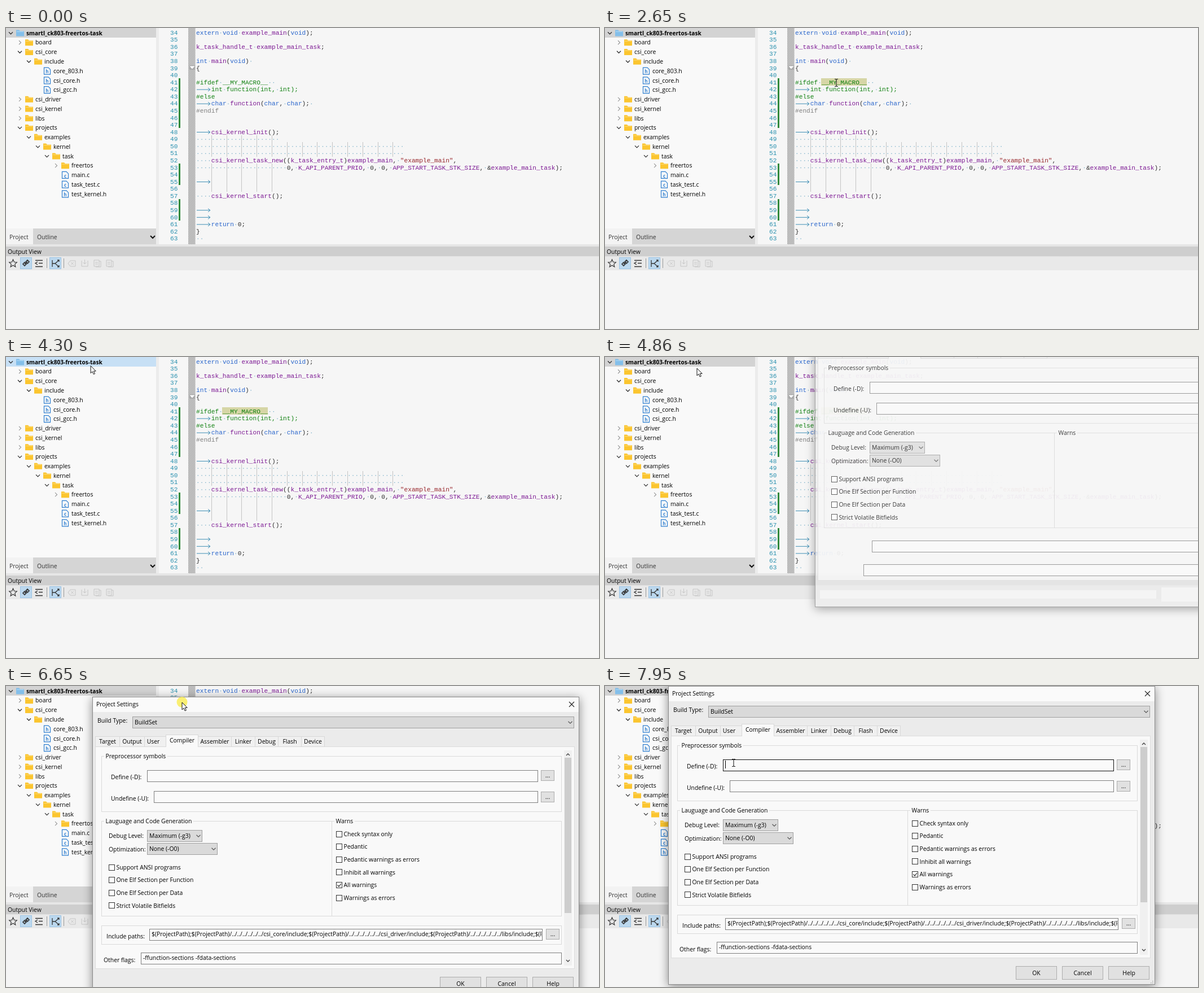
An HTML page with a canvas that plays this animation: 1051 by 533 pixels, repeating every 8000 ms.

```html
<!DOCTYPE html>
<html lang="en">
<head>
<meta charset="utf-8">
<title>Project settings</title>
<style>
html, body { margin: 0; width: 100%; height: 100%; overflow: hidden; background: #f5f5f5; }
canvas { display: block; }
</style>
</head>
<body>
<canvas id="stage" width="1051" height="533"></canvas>
<script>
const g = document.getElementById('stage').getContext('2d');
const UI = '10.4px "Open Sans", "Noto Sans", sans-serif';
const BOLD = 'bold 10.1px "Open Sans", "Noto Sans", sans-serif';
const MONO = '11.17px "Liberation Mono", monospace';
const LOOP = 8000, COL = 6.7, ROW = 12.57, LEFT = 337;

function box(x, y, w, h, fill, border) {
  if (fill) { g.fillStyle = fill; g.fillRect(x, y, w, h); }
  if (border) { g.strokeStyle = border; g.lineWidth = 1; g.strokeRect(x + .5, y + .5, w - 1, h - 1); }
}
function text(s, x, y, color = '#000', font = UI, align = 'left') {
  g.font = font; g.fillStyle = color; g.textAlign = align;
  g.fillText(s, x, y + 3.7);
}
function line(d, color, width = 1) {
  g.strokeStyle = color; g.lineWidth = width;
  g.stroke(new Path2D(d));
}
function shape(d, fill) { g.fillStyle = fill; g.fill(new Path2D(d)); }
function disc(x, y, r, fill) {
  g.fillStyle = fill; g.beginPath(); g.arc(x, y, r, 0, 7); g.fill();
}
function down(x, y, color = '#555', r = 3.5, width = 1.1) {
  line(`M${x - r} ${y - r / 2}l${r} ${r} ${r} ${-r}`, color, width);
}

// [depth, kind, label]; kinds: o open folder, c closed folder, h / C file
const tree = [
  [0, 'o', 'smartl_ck803-freertos-task'], [1, 'c', 'board'], [1, 'o', 'csi_core'],
  [2, 'o', 'include'], [3, 'h', 'core_803.h'], [3, 'h', 'csi_core.h'], [3, 'h', 'csi_gcc.h'],
  [1, 'c', 'csi_driver'], [1, 'c', 'csi_kernel'], [1, 'c', 'libs'], [1, 'o', 'projects'],
  [2, 'o', 'examples'], [3, 'o', 'kernel'], [4, 'o', 'task'], [5, 'c', 'freertos'],
  [5, 'C', 'main.c'], [5, 'C', 'task_test.c'], [5, 'h', 'test_kernel.h']
];

const code = {
  34: 'extern void example_main(void);', 36: 'k_task_handle_t example_main_task;',
  38: 'int main(void) ', 39: '{', 41: '#ifdef __MY_MACRO__  ',
  42: '\tint function(int, int);', 43: '#else', 44: '\tchar function(char, char); ', 45: '#endif',
  48: '\tcsi_kernel_init();', 49: ' '.repeat(22), 50: ' '.repeat(55), 51: ' '.repeat(55),
  52: '    csi_kernel_task_new((k_task_entry_t)example_main, "example_main",',
  53: ' '.repeat(24) + '0, K_API_PARENT_PRIO, 0, 0, APP_START_TASK_STK_SIZE, &example_main_task);',
  55: '\t', 57: '    csi_kernel_start();', 59: '\t', 60: '\t', 61: '\treturn 0;', 62: '}', 63: '  '
};
const fixed = { 41: '#108010', 42: '#108010', 43: '#108010', 45: '#808080' };
const TOKEN = /\t| |"[^"]*"|#?[A-Za-z_]\w*|\d+|[^\w\s"#]+/g;

function tokenColor(s) {
  if (/^(extern|void|int|char|return)$/.test(s)) return '#2a66cc';
  if (s[0] === '"') return '#98262c';
  return /^[A-Za-z_]/.test(s) ? '#7d1a94' : '#303030';
}

function sidebar(t) {
  box(0, 0, 266, 355, '#f9f9f9');
  box(0, 0, 266, 17, t >= 3540 && t < 4620 ? '#c7e0f5' : '#d3d3d3');
  tree.forEach(([d, kind, label], i) => {
    const x = 8.5 + 16 * d, y = 9 + 16.76 * i, ix = x + 16.5;
    if (kind === 'o') down(x, y, '#333', 3.5, 1.3);
    if (kind === 'c') line(`M${x - 1.5} ${y - 3.5}l3.5 3.5-3.5 3.5`, '#999', 1.2);
    if (/[oc]/.test(kind)) {
      shape(`M${ix - 7} ${y - 5.5}h5l2 2h7v9h-14z`, i ? '#fbc52f' : '#83bfea');
      line(`M${ix - 6} ${y - 2.5}h12`, i ? '#fddd83' : '#b4dbf5');
    } else {
      line(`M${ix - 5.5} ${y - 6}h7.5l3.5 3.5v8.5h-11z`, '#2f7fd0', 1.2);
      text(kind.toLowerCase(), ix, y + .5, '#2f7fd0', 'bold 8px "Open Sans", sans-serif', 'center');
    }
    text(label, 36 + 16 * d, y, '#000', i ? UI : BOLD);
  });
  box(0, 355, 266, 28, '#d5d5d5');
  box(0, 355, 48, 28, '#f3f3f3');
  text('Project', 6, 370, '#333');
  text('Outline', 55, 370, '#333');
  down(260, 370, '#111', 4, 2);
  box(266, 0, 5, 383, '#ececec');
}

function editor(t) {
  box(271, 0, 780, 383, '#f6f6f6');
  box(323, 0, 12.5, 383, '#c6c6c6');
  g.save();
  g.beginPath(); g.rect(323, 0, 12.5, 383); g.clip();
  for (let y = -12; y < 383; y += 3) line(`M323 ${y + 13}l13-13`, '#a9a9a9');
  g.restore();
  box(325, 66, 10, 8, '#aaa');
  shape('M325.5 67.5h9l-4.5 5z', '#fff');
  for (const [y, h] of [[89, 88], [240, 38], [303, 38]]) box(306, y, 3, h, '#328a3c');

  for (let k = 1; k <= 13; k++) {
    const x = Math.round(LEFT + k * 4 * COL) + .5;
    line(k < 6 ? `M${x} 190V228M${x} 240V290` : `M${x} 202V228`, '#c4c4c4');
  }
  if (t >= 1900) box(383, 89, 81, 13, '#d6d6a6');
  for (let n = 34; n <= 63; n++) {
    const y = 8 + ROW * (n - 34);
    text(n, 304.5, y, '#2b91af', MONO, 'right');
    let col = 0;
    for (const s of (code[n] || '').match(TOKEN) || []) {
      const x = LEFT + col * COL;
      if (s === '\t') {
        line(`M${x + 1} ${y + .5}h24m-4-3l4 3-4 3`, '#3f8fb5');
        col += 4;
        continue;
      }
      if (s === ' ') box(x + 2.7, y, 1.3, 1.3, '#6fa9c4');
      else text(s, x, y, fixed[n] || tokenColor(s), MONO);
      col += s.length;
    }
  }
  if (t >= 1530 && t < 1900) box(476.5, 90, 1, 12, '#000');
}

function output() {
  box(0, 383, 1051, 4, '#e6e6e6');
  box(0, 387, 1051, 17.5, '#cecece');
  text('Output View', 3, 396.5);
  box(0, 404.5, 1051, 25, '#e9e9e9');
  box(0, 429, 1051, 104, '#f5f5f5');
  for (const x of [25, 77]) box(x, 406, 21, 21, '#bcd8ee', '#9dc4e4');
  for (const x of [72, 102]) box(x, 408, 1, 17, '#999');
  line('M12.5 410l2 4.5 4.8.4-3.6 3.2 1.1 4.8-4.3-2.6-4.3 2.6 1.1-4.8-3.6-3.2 4.8-.4z', '#333', 1.2);
  line('M30 418l3-3 3 3-3 3zM35 414l3-3 3 3-3 3zM33 418l5-4', '#333', 1.6);
  line('M52 411.5h13M58 416.5h7M52 422.5h13M56 414l-4 2.5 4 2.5', '#333', 1.4);
  line('M82 411v12M82 417h5l6-5M87 417l6 5M91 411h3v3M91 423h3v-3', '#333', 1.3);
  const pale = '#c6c6c6';
  line('M110 417l4-5h9v10h-9zM115 414.5l5 5M120 414.5l-5 5', pale);
  line('M134 412v10h11v-10M139.5 410v8m-3-3l3 3 3-3', pale);
  for (const x of [162, 184]) line(`M${x - 6} 411h9v11h-9zM${x + 3} 413h3v10h-9M${x - 4} 415h5m-5 3h5`, pale);
}

function combo(x, y, w, s, fill = '#dadada') {
  box(x, y, w, 21, fill, '#a0a0a0');
  text(s, x + 4, y + 10);
  down(x + w - 7, y + 10.5);
}
function button(x, y, w, h, s) {
  box(x, y, w, h, '#e1e1e1', '#adadad');
  text(s, x + w / 2, y + h / 2, '#000', UI, 'center');
}
function field(x, y, w, s = '', border = '#7f7f7f') {
  box(x, y, w, 21, '#fafafa', border);
  g.save();
  g.beginPath(); g.rect(x + 1, y, w - 3, 20); g.clip();
  text(s, x + 4, y + 9.5);
  g.restore();
}
function group(x, y, w, h, s) {
  box(x, y, w, h, null, '#dadada');
  if (!s) return;
  g.font = UI;
  box(x + 5, y - 2, g.measureText(s).width + 5, 5, '#f9f9f9');
  text(s, x + 7.5, y);
}
function check(x, y, s, on) {
  const top = Math.round(y - 5.5);
  box(x, top, 11, 11, '#fff', '#333');
  if (on) line(`M${x + 2.5} ${top + 5.5}l2.5 2.5 4-5`, '#222', 1.2);
  text(s, x + 13.5, y);
}

const UP = '/..'.repeat(6) + '/', ROOT = '$(ProjectPath)';
const includes = [ROOT, ...['csi_core', 'csi_driver', 'libs'].map(d => ROOT + UP + d + '/include'), ROOT].join(';');
const tabs = [['Target', 5, 48], ['Output', 48, 92], ['User', 92, 130], ['Compiler', 130, 187], ['Assembler', 187, 246],
  ['Linker', 246, 288], ['Debug', 288, 329], ['Flash', 329, 370], ['Device', 370, 411]];

// Shadow only outside the window, so it cannot darken a fading dialog.
function shadow(w, h) {
  g.save();
  const outside = new Path2D();
  outside.rect(-40, -40, w + 80, h + 80);
  outside.rect(0, 0, w, h);
  g.clip(outside, 'evenodd');
  g.shadowColor = 'rgba(0,0,0,.45)'; g.shadowBlur = 16; g.shadowOffsetY = 3;
  box(0, 0, w, h, '#000');
  g.restore();
}

function dialog(t) {
  const [x, y] = place(windowPath, t).map(Math.round);
  const ready = t >= 4950, focus = t >= 7800;
  g.save();
  g.globalAlpha = Math.min(1, (t - 4780) / 105);
  g.translate(x, y);
  shadow(863, 529);
  box(0, 0, 863, 529, '#ebebeb');
  box(0, 0, 863, 529, null, '#8a8a8a');
  box(1, 1, 861, 26, '#fafafa');
  text('Project Settings', 7, 13.5);
  line('M845 9l9 9m0-9l-9 9', '#222', 1.1);
  text('Build Type:', 9, 42);
  combo(71, 35, 783, 'BuildSet', t < 6500 ? '#d3dee6' : '#d9d9d9');

  box(5, 88, 850, 394, '#f9f9f9', '#dcdcdc');
  for (const [s, a, b] of tabs) {
    const active = s === 'Compiler';
    box(a, active ? 67 : 70, b - a + 1, active ? 22 : 19, active ? '#f9f9f9' : '#f0f0f0', '#d8d8d8');
    if (active) box(a + 1, 86, b - a - 1, 4, '#f9f9f9');
    text(s, s === 'User' ? 108 : (a + b) / 2 + .5, active ? 77.5 : 79.5, '#000', UI, 'center');
  }

  group(16, 105, 816, 99, 'Preprocessor symbols');
  text('Define (-D):', 33, 142);
  field(97, 130, 693, '', focus ? '#111' : '#7f7f7f');
  if (focus) box(101, 132, 1, 14, '#000');
  text('Undefine (-U):', 33, 180);
  field(109, 167, 681);
  for (const by of [130, 168]) button(795, by, 24, 19, '...');

  group(16, 220, 409, 169, 'Lauguage and Code Generation');
  group(424, 220, 408, 169, 'Warns');
  text('Debug Level:', 29, 246.5);
  combo(97, 236, 98, 'Maximum (-g3)');
  text('Optimization:', 29, 270);
  combo(97, 259, 125, 'None (-O0)');
  ['Support ANSI programs', 'One Elf Section per Function', 'One Elf Section per Data', 'Strict Volatile Bitfields']
    .forEach((s, i) => check(29, 302 + 22.6 * i, s));

  if (ready) {
    ['Check syntax only', 'Pedantic', 'Pedantic warnings as errors', 'Inhibit all warnings', 'All warnings', 'Warnings as errors']
      .forEach((s, i) => check(432, 243 + 22.6 * i, s, i === 4));
    group(16, 405, 816, 34);
    text('Include paths:', 25, 424);
    text('Other flags:', 20, 466);
    button(804, 411, 24, 19, '...');
    [['OK', 616], ['Cancel', 698], ['Help', 780]].forEach(([s, bx]) => button(bx, 496, 73, 24, s));
    box(836, 95, 14, 381, '#f0f0f0');
    box(837, 108, 12, 275, '#cdcdcd');
    line('M840 104l3-3 3 3M840 466l3 3 3-3', '#444', 1.4);
    for (const [i, j] of [[0, 0], [3, 0], [3, -3]]) box(855 + i, 525 + j, 1.5, 1.5, '#aaa');
  } else {
    box(9, 499, 596, 15, '#f7f7f7');
    box(614, 494, 248, 25, '#f7f7f7');
  }
  field(101, 411, 697, ready ? includes : '');
  field(86, 453, 746, ready ? '-ffunction-sections -fdata-sections' : '');
  g.restore();
}

// Keys are [time, x, y]; positions hold where two keys agree.
const windowPath = [[0, 372, -86], [6359, 372, -86], [6360, 280, -8], [6650, 153, 19], [6930, 112, 0]];
const mousePath = [
  [320, 1018, 528], [600, 800, 390], [1120, 418, 123], [1180, 418, 123], [1310, 408, 114], [1500, 408, 114],
  [1530, 406, 106], [1800, 410, 97], [2650, 410, 97], [3270, 139.5, 12], [4230, 139.5, 12],
  [4500, 163, 20], [4900, 163, 20], [5030, 167, 21], [5100, 167, 21], [5430, 433, 55], [5570, 433, 55],
  [5700, 505, -18], [6200, 531, -76], [6359, 531, -76], [6360, 426, 20], [6650, 312, 29], [6930, 271, 10],
  [7260, 271, 10], [7750, 228, 136]
];
function place(keys, t) {
  const i = keys.findIndex(k => k[0] > t);
  if (i < 0) return keys[keys.length - 1].slice(1);
  if (!i) return keys[0].slice(1);
  const [t0, x0, y0] = keys[i - 1], [t1, x1, y1] = keys[i];
  const p = (t - t0) / (t1 - t0), e = p * (2 - p);
  return [x0 + (x1 - x0) * e, y0 + (y1 - y0) * e];
}

const presses = [[1900, 1990], [2080, 2170], [4540, 4620], [6360, 6930], [7790, 7880]];
function mouse(t) {
  if (t < 320) return;
  const [x, y] = place(mousePath, t);
  if (presses.some(([a, b]) => t >= a && t < b)) disc(x, y - .5, 9.5, 'rgba(250,235,70,.75)');
  if (t >= 3540 && t < 3700) disc(x, y - .5, 9.5, 'rgba(226,60,68,.85)');
  const beam = t < 4780 ? x > 336 && y < 383 : t > 7260 && y > 129;
  if (beam) {
    line(`M${x - 3} ${y - 6.5}h2l1 1 1-1h2M${x} ${y - 5.5}v11M${x - 3} ${y + 6.5}h2l1-1 1 1h2`, '#222', 1.1);
  } else {
    const arrow = `M${x} ${y}v13l3-2.8 2.2 4.8 2.2-1-2.2-4.6h4z`;
    shape(arrow, '#fff');
    line(arrow, '#111');
  }
}

function draw(now) {
  const t = now % LOOP;
  sidebar(t);
  editor(t);
  output();
  if (t > 4780) dialog(t);
  mouse(t);
}

let start;
function tick(now) {
  start ??= now;
  draw(now - start);
  requestAnimationFrame(tick);
}
requestAnimationFrame(tick);
</script>
</body>
</html>
```
